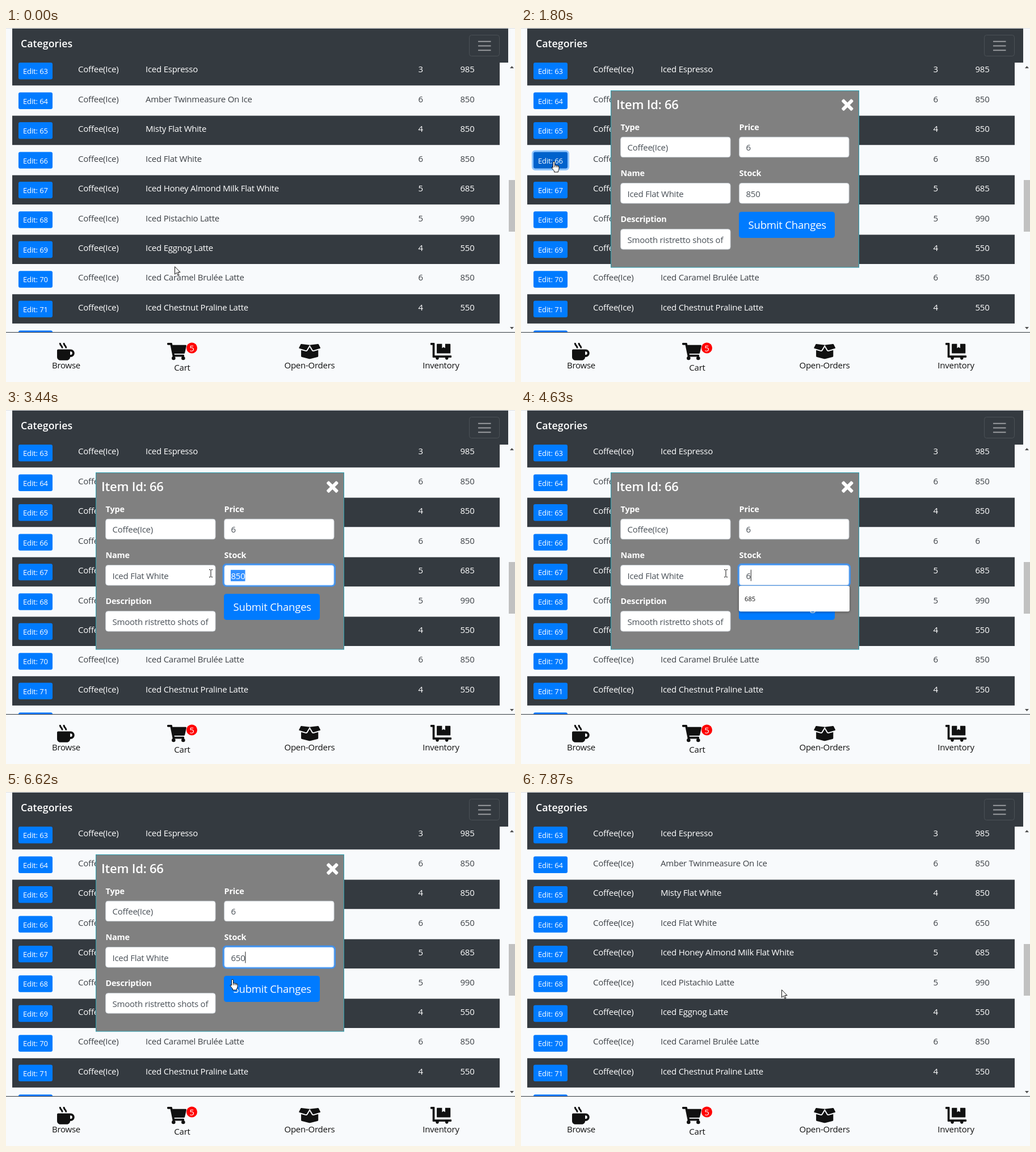
Write an HTML page that moves like this. It is 897 px wide and 624 px high and loops after 8 s.

```html
<!DOCTYPE html>
<html lang="en">
<head>
<meta charset="utf-8">
<title>Inventory editor</title>
<style>
  html, body { margin: 0; width: 100%; height: 100%; overflow: hidden; background: #f8fafc; }
  svg { display: block; width: 100vw; height: 100vh; }
  text { font: 400 15px "Open Sans", "Noto Sans", sans-serif; letter-spacing: -.016em; white-space: pre; }
  .edit { font-size: 13px; fill: #fff; letter-spacing: -.01em; }
  .light { fill: #3d4146; }
  .dark, .label, .title, .brand, .submit { fill: #fff; }
  .brand { font-size: 17.8px; font-weight: 600; letter-spacing: 0; }
  .title { font-size: 22px; font-weight: 600; letter-spacing: -.01em; }
  .label { font-size: 14.4px; font-weight: 700; letter-spacing: -.01em; }
  .submit { font-size: 18.5px; letter-spacing: -.01em; }
  .value { fill: #495057; }
  .nav { fill: #111; font-weight: 500; text-anchor: middle; }
  .hint { font-size: 11.2px; font-weight: 500; fill: #111; letter-spacing: 0; }
</style>
</head>
<body>
<svg id="stage" viewBox="0 0 897 624" xmlns="http://www.w3.org/2000/svg"></svg>
<script>
const LOOP = 8000, PITCH = 52.45, BLUE = '#007bff', DARK = '#343a40';

const items = [
  ['Iced Espresso', 3, 985],
  ['Amber Twinmeasure On Ice', 6, 850],
  ['Misty Flat White', 4, 850],
  ['Iced Flat White', 6, 850],
  ['Iced Honey Almond Milk Flat White', 5, 685],
  ['Iced Pistachio Latte', 5, 990],
  ['Iced Eggnog Latte', 4, 550],
  ['Iced Caramel Brulée Latte', 6, 850],
  ['Iced Chestnut Praline Latte', 4, 550]
];

const rect = (x, y, w, h, fill, more = '') =>
  `<rect x="${x}" y="${y}" width="${w}" height="${h}" fill="${fill}" ${more}/>`;
const text = (x, y, cls, s, more = '') => `<text x="${x}" y="${y}" class="${cls}" ${more}>${s}</text>`;
const icon = (x, y, k, d) =>
  `<path transform="translate(${x} ${y}) scale(${k})" fill="#111" fill-rule="evenodd" d="${d}"/>`;

function row([name, price, stock], i) {
  const y = i * PITCH, base = 78.3 + y, cls = i % 2 ? 'light' : 'dark';
  const id = i === 3 ? 'edit' : 'e' + i;
  return (i % 2 ? '' : rect(11, 49.7 + y, 859, 51.6, DARK)) +
    rect(20.5, 59.7 + y, 63, 32.4, 'none', `id="${id}Ring" rx="4.5" stroke="#268fff" stroke-opacity="0" stroke-width="3"`) +
    rect(22, 61.1 + y, 60, 29.4, BLUE, `id="${id}" rx="3"`) +
    text(30, 81.2 + y, 'edit', 'Edit: ' + (63 + i)) +
    text(127, base, cls, 'Coffee(Ice)') +
    text(246, base, cls, name) +
    text(726.5, base, cls, price) +
    text(800.5, base, cls, stock, i === 3 ? 'id="cell"' : '');
}

function field(x, y, label, value, id = '') {
  return text(x, y - 12.5, 'label', label) +
    rect(x + .2, y + .3, 193.3, 35.4, '#fff', `rx="4" stroke="#ced4da" id="${id}Box"`) +
    (id ? rect(396, y + 8.5, 25.5, 20, '#3390ff', 'id="select"') : '') +
    text(x + 12, y + 24.4, 'value', value, `id="${id}Text"`);
}

const mug = 'M127 146c1 8 8 14 16 14h17c9 0 17-8 16-18-4-28-17-54-37-75-14-14-23-33-26-53C112 6 105 0 97 0H80C71 0 63 8 64 18c4 32 18 61 41 84 12 13 19 28 22 44zm112 0c1 8 8 14 16 14h17c9 0 17-8 16-18-4-28-17-54-37-75-14-14-23-33-26-53C224 6 217 0 209 0h-17c-9 0-17 8-16 18 4 32 18 61 41 84 12 13 19 28 22 44zM400 192H32c-18 0-32 14-32 32v192c0 53 43 96 96 96h192c53 0 96-43 96-96h16c62 0 112-50 112-112s-50-112-112-112zm0 160h-16v-96h16c26 0 48 22 48 48s-22 48-48 48z';
const cart = 'M528 301l47-208c4-15-8-29-23-29H159l-9-45C148 8 138 0 127 0H24C11 0 0 11 0 24v16c0 13 11 24 24 24h70l70 343c-17 10-28 28-28 49a56 56 0 0 0 112 0c0-16-6-30-17-40h210c-11 10-17 24-17 40a56 56 0 0 0 112 0c0-22-13-41-32-50l6-25c3-15-8-29-24-29H218l-6-32h293c11 0 21-8 23-19z';
const box = 'M426 256c-17 0-33-9-42-23L320 126l-64 107c-9 14-25 23-42 23-4 0-9-1-13-2L64 215v178c0 15 10 28 24 31l216 54c10 3 21 3 31 0l217-54c14-4 24-16 24-31V215l-137 39c-4 1-9 2-13 2zm212-112L587 41c-3-6-10-10-17-9L320 64l92 152c4 6 11 9 18 7l198-56c10-3 15-14 10-23zM53 41L2 144c-5 9 0 20 10 23l198 56c7 2 14-1 18-7L320 64 70 32c-7-1-14 3-17 9z';
const dolly = 'M208 320h384c9 0 16-7 16-16V48c0-9-7-16-16-16H448v128l-48-32-48 32V32H208c-9 0-16 7-16 16v256c0 9 7 16 16 16zm416 64H128V16c0-9-7-16-16-16H16C7 0 0 7 0 16v32c0 9 7 16 16 16h48v368c0 9 7 16 16 16h83a48 48 0 1 0 90 0h198a48 48 0 1 0 90 0h83c9 0 16-7 16-16v-32c0-9-7-16-16-16z';

const header = rect(0, 0, 897, 1, '#dfe1e4') + rect(11, 1, 874, 60, DARK) +
  text(26, 34.3, 'brand', 'Categories') +
  rect(816.5, 12.5, 53, 37, 'none', 'rx="4" stroke="#4b5156"') +
  '<path d="M832 23.8h22.5M832 31.5h22.5M832 39.2h22.5" stroke="#999c9f" stroke-width="2"/>';

const scrollbar = rect(886, 268, 11, 91, '#c1c1c1') +
  '<path d="M888 71l3.5-4 3.5 4zM888 527l3.5 4 3.5-4z" fill="#505050"/>';

const footer = rect(0, 536, 897, 88, '#f8fafc') + rect(0, 536, 897, 1, '#343a40') +
  icon(90, 555, .06, mug) + icon(284, 555, .059, cart) +
  icon(516.3, 555, .059, box) + icon(748, 555, .058, dolly) +
  '<circle cx="327.5" cy="564" r="9.5" fill="#f00"/>' +
  text(327.4, 569.5, 'dark', '5', 'text-anchor="middle"') +
  [[106, 600, 'Browse'], [310.5, 604, 'Cart'], [535, 600, 'Open-Orders'], [766.5, 600, 'Inventory']]
    .map(([x, y, s]) => text(x, y, 'nav', s)).join('');

const bar = a => rect(-12.5, -3, 25, 6, '#fff', `rx="1.8" transform="translate(575.3 135.6) rotate(${a})"`);

const modal = '<g id="modal">' +
  rect(158.5, 110.5, 437, 311.5, '#808080', 'stroke="#2a9fb0"') +
  text(168, 142.8, 'title', 'Item Id: 66') + bar(45) + bar(-45) +
  field(175.5, 192, 'Type', 'Coffee(Ice)') +
  field(384.5, 192, 'Price', '6') +
  field(175.5, 273.3, 'Name', 'Iced Flat White') +
  rect(382.9, 271.7, 196.8, 38.6, 'none', 'id="focus" rx="5.5" stroke="#4090ec" stroke-width="2.6"') +
  field(384.5, 273.3, 'Stock', '850', 'stock') +
  rect(0, 281.5, 1, 20, '#222', 'id="caret"') +
  field(175.5, 354.4, 'Description', 'Smooth ristretto shots of') +
  rect(382.5, 322.5, 172, 49, 'none', 'id="submitRing" rx="6" stroke="#268fff" stroke-opacity=".5" stroke-width="3"') +
  rect(384, 324, 169, 46, BLUE, 'id="submit" rx="4.5"') +
  text(400.5, 354.3, 'submit', 'Submit Changes') +
  '<g id="menu">' +
  rect(384, 310, 195, 45.3, '#fff', 'rx="3" style="filter:drop-shadow(0 1px 2px #0006)"') +
  text(394, 337, 'hint', '685') + '</g></g>';

const pointers =
  '<path id="arrow" d="M.5 .7V14.2l3.1-3 2.3 5 2-.9-2.2-4.8H10z" fill="#fff" stroke="#111"/>' +
  '<path id="beam" d="M-3-6.5h2l1 1 1-1h2M0-5.5v11M-3 6.5h2l1-1 1 1h2" fill="none" stroke="#111"/>' +
  '<path id="hand" d="M-1.5 11V1.8a1.5 1.5 0 0 1 3 0V7q1.5-1 2.8.5q1.5-.8 2.6.6q2-.5 2.1 1.6V13q0 2.5-1.5 4v2h-7v-2q-2.5-2.5-4.5-6q.2-2 2.5 0zM1.5 7v3.5M4.3 7.5v3M6.9 8.1v2.5" fill="#fff" stroke="#111"/>';

const stage = document.getElementById('stage');
stage.innerHTML = items.map(row).join('') + rect(22, 61.1 + 9 * PITCH, 60, 29.4, BLUE, 'rx="3"') +
  header + scrollbar + footer + modal + pointers;

const $ = id => document.getElementById(id);
const show = (id, on) => $(id).setAttribute('visibility', on ? 'inherit' : 'hidden');
const set = (id, name, value) => $(id).setAttribute(name, value);
const pick = (t, steps) => steps.reduce((now, s) => t >= s[0] ? s : now);

// start time, pointer shape, hot spot
const moves = [
  [0, 'arrow', 297, 420], [120, 'arrow', 291, 413], [240, 'arrow', 281, 402],
  [390, 'arrow', 264, 384], [510, 'arrow', 240, 357], [630, 'arrow', 215, 330],
  [780, 'beam', 178, 289], [920, 'arrow', 150, 270], [1040, 'arrow', 118, 252],
  [1160, 'arrow', 96, 241], [1310, 'hand', 68, 237], [1430, 'hand', 58, 235],
  [2170, 'hand', 72, 239], [2290, 'arrow', 210, 262], [2410, 'beam', 335, 289],
  [2550, 'beam', 400, 289], [2670, 'beam', 432, 289], [3170, 'beam', 428, 289],
  [3290, 'beam', 421, 289], [3440, 'beam', 361, 288], [6500, 'beam', 374, 302],
  [6620, 'hand', 399, 330], [6740, 'hand', 418, 346], [6890, 'hand', 440, 358],
  [7010, 'hand', 455, 360], [7130, 'hand', 459, 348], [7870, 'arrow', 459, 348]
];
const editFill = [[0, BLUE], [1310, '#0072eb'], [1430, '#0069d9'], [1800, '#0062cc'], [2170, '#0069d9'], [2290, BLUE]];
const editRing = [[0, 0], [1800, .5], [3170, .2], [3290, 0]];
const submitFill = [[0, BLUE], [6740, '#0072eb'], [6890, '#0069d9'], [7380, '#0062cc']];
const stockSteps = [[0, '850'], [4630, '6'], [4750, '65'], [5250, '650']];

function draw(t) {
  const [, shape, x, y] = pick(t, moves);
  for (const id of ['arrow', 'beam', 'hand']) show(id, id === shape);
  set(shape, 'transform', `translate(${x} ${y})`);

  const open = t >= 1800 && t < 7870;
  const focused = t >= 3170 && t < 7380;
  const selected = t >= 3440 && t < 4630;
  const stock = pick(t, stockSteps)[1];
  $('cell').textContent = $('stockText').textContent = stock;
  set('stockText', 'style', selected ? 'fill:#fff' : '');
  set('stockBox', 'stroke', focused ? '#80bdff' : '#ced4da');
  set('caret', 'x', 396.5 + 8.3 * stock.length);
  set('edit', 'fill', pick(t, editFill)[1]);
  set('editRing', 'stroke-opacity', pick(t, editRing)[1]);
  set('submit', 'fill', pick(t, submitFill)[1]);
  set('focus', 'stroke-opacity', t < 3290 ? .5 : 1);

  show('modal', open);
  const inModal = (id, on) => show(id, open && on);
  inModal('focus', focused);
  inModal('select', selected);
  inModal('menu', t >= 4630 && t < 4750);
  inModal('caret', (t >= 3170 && t < 3440) || (t >= 4630 && t < 5870) || (t >= 6370 && t < 6890));
  inModal('submitRing', t >= 7380);
}

const start = performance.now();
function tick() {
  draw((performance.now() - start) % LOOP);
  requestAnimationFrame(tick);
}
tick();
</script>
</body>
</html>
```
